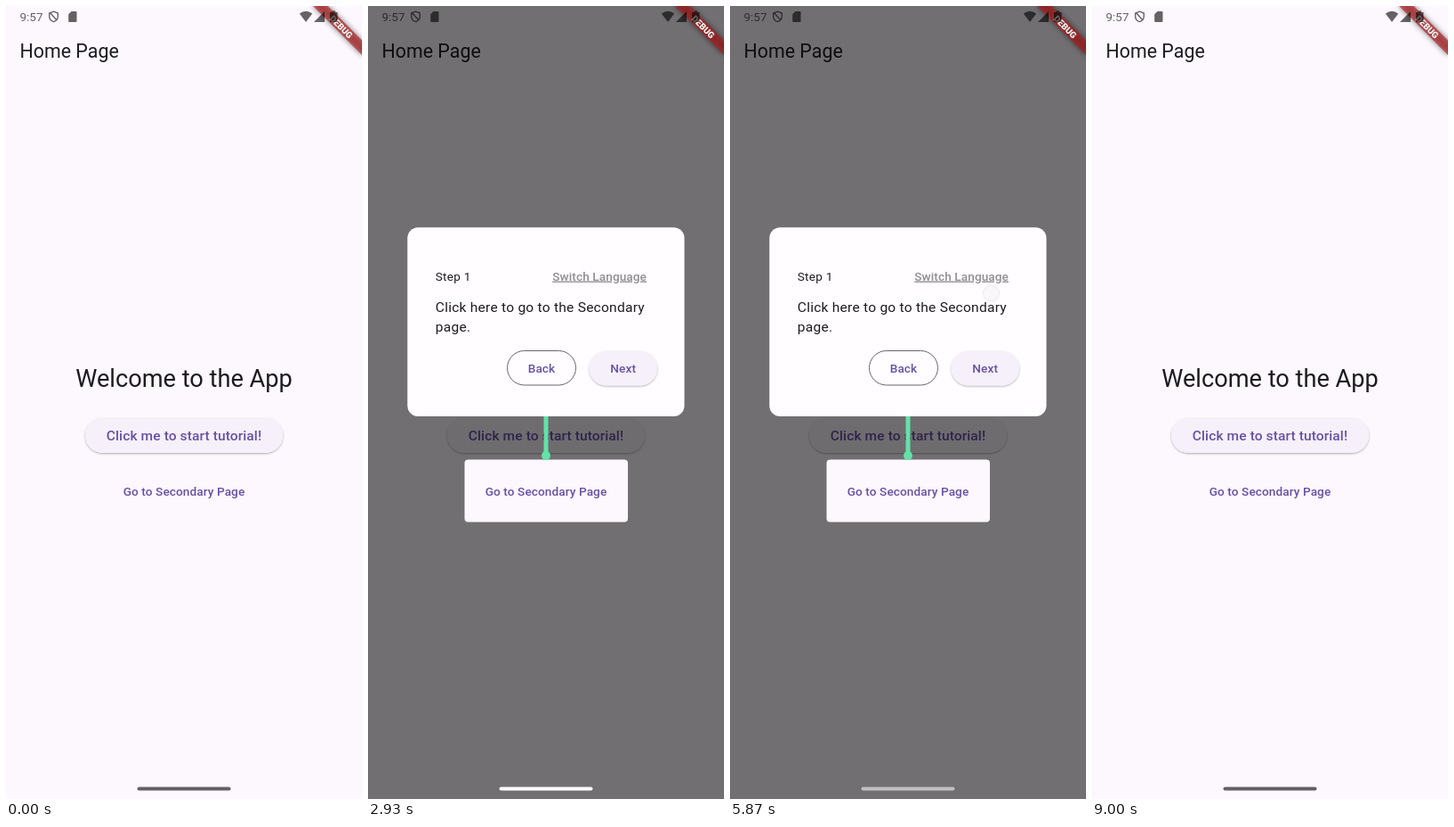
An HTML page that plays this animation: 400x889 px, repeating every 9070 ms.

```html
<!DOCTYPE html>
<html lang="en">
<head>
<meta charset="utf-8">
<title>App tutorial</title>
<style>
  html, body { margin: 0; width: 100%; height: 100%; overflow: hidden; background: #fdf7fe; }
  svg { display: block; width: 100%; height: 100%; }
  text { font-family: Roboto, 'Noto Sans CJK SC', 'Noto Sans CJK', sans-serif; fill: #1d1b20; white-space: pre; }
  .label { font-size: 13.6px; font-weight: 500; letter-spacing: .097px; fill: #6750a4; }
  .big { font-size: 15.55px; }
  .mid { text-anchor: middle; }
  .step { font-size: 13.6px; letter-spacing: .24px; }
  .body { font-size: 15.55px; letter-spacing: .24px; }
  .switch { fill: #918d93; text-anchor: end; text-decoration: underline; }
  .raised { fill: #f6f0fa; filter: url(#lift); }
  .outlined { fill: none; stroke: #6b666f; }
</style>
</head>
<body>
<svg viewBox="0 0 400 889" preserveAspectRatio="none">
  <defs>
    <filter id="lift" x="-10%" y="-20%" width="120%" height="150%">
      <feDropShadow dx="0" dy="1" stdDeviation=".9" flood-color="#000" flood-opacity=".32"/>
    </filter>
    <filter id="blur" x="-20%" y="-80%" width="140%" height="260%"><feGaussianBlur stdDeviation="3"/></filter>
    <radialGradient id="ink">
      <stop offset="0" stop-color="#6750a4" stop-opacity=".17"/>
      <stop offset=".45" stop-color="#6750a4" stop-opacity=".12"/>
      <stop offset="1" stop-color="#6750a4" stop-opacity="0"/>
    </radialGradient>
    <clipPath id="startClip"><rect x="89" y="462" width="222" height="39" rx="19.5"/></clipPath>
    <clipPath id="enClip"><rect x="196" y="284" width="129" height="38.5" rx="19.2"/></clipPath>
    <clipPath id="zhClip"><rect x="247" y="306" width="78" height="38.5" rx="19.2"/></clipPath>
  </defs>

  <rect width="400" height="889" fill="#fdf7fe"/>
  <text x="15.5" y="57.5" font-size="21.4">Home Page</text>
  <text class="mid" x="200" y="427" font-size="27.2">Welcome to the App</text>
  <rect class="raised" x="89" y="462" width="222" height="39" rx="19.5"/>
  <g id="startInk" clip-path="url(#startClip)"></g>
  <text class="label big mid" x="200" y="487">Click me to start tutorial!</text>
  <text class="label mid" x="200" y="549">Go to Secondary Page</text>

  <g id="tour">
    <path fill="#000" fill-opacity=".55" fill-rule="evenodd"
      d="M0 0H400V889H0ZM112.5 508.5H288a4 4 0 0 1 4 4V574.500a4 4 0 0 1-4 4H112.500a4 4 0 0 1-4-4V512.500a4 4 0 0 1 4-4Z"/>
    <rect id="card" x="44.300" width="311.200" rx="12" fill="#fffdff"/>
    <path d="M200 460V503" stroke="#63e2a8" stroke-width="5"/>
    <circle cx="200" cy="504" r="5" fill="#63e2a8"/>
    <g id="en">
      <text class="step" x="75.800" y="307.500">Step 1</text>
      <g id="enInk" clip-path="url(#enClip)"></g>
      <text class="label switch" x="313" y="307.500">Switch Language</text>
      <text class="body" x="75.800" y="342.500">Click here to go to the Secondary</text>
      <text class="body" x="75.800" y="365">page.</text>
      <rect class="outlined" x="156.500" y="386.500" width="77" height="38.500" rx="19.250"/>
      <text class="label mid" x="195" y="410.500">Back</text>
      <rect class="raised" x="248.500" y="387" width="76.500" height="38.500" rx="19.250"/>
      <text class="label mid" x="286.700" y="410.500">Next</text>
    </g>
    <g id="zh" lang="zh-CN">
      <text class="step" x="75.800" y="330.500">步骤 1</text>
      <g id="zhInk" clip-path="url(#zhClip)"></g>
      <text class="label switch" x="313" y="330.500">切换语言</text>
      <text class="body" x="75.800" y="365">点击这里访问次要页面。</text>
      <rect class="outlined" x="147.500" y="386.500" width="73.500" height="38.500" rx="19.250"/>
      <text class="label mid" x="184.200" y="411">返回</text>
      <rect class="raised" x="236" y="387" width="89" height="38.500" rx="19.250"/>
      <text class="label mid" x="280.500" y="411">下一步</text>
    </g>
  </g>

  <g transform="translate(400 0) rotate(45)">
    <rect x="-39" y="27.200" width="78" height="11.700" opacity=".5" filter="url(#blur)"/>
    <rect x="-39" y="27.200" width="78" height="11.700" fill="#b71c1c" fill-opacity=".63"/>
    <text class="mid" x="0" y="36.600" font-size="9.900" font-weight="900" style="fill:#fff">DEBUG</text>
  </g>

  <g opacity=".6">
    <text x="15.500" y="16.500" font-size="13.500" style="fill:#000">9:57</text>
    <path d="M53.500 6.200L58.300 8V11.500C58.300 14.500 56.200 16.800 53.500 17.700C50.800 16.800 48.700 14.500 48.700 11.500V8ZM49.500 7.500L57 16" fill="none" stroke="#000" stroke-width="1.400"/>
    <path d="M73.500 6H78.500a1 1 0 0 1 1 1V17a1 1 0 0 1-1 1H71.200a1 1 0 0 1-1-1V9.300Z"/>
    <path d="M329.800 8.600Q337 3 344.200 8.600L337 18Z"/>
    <path d="M358 6V18H346Z"/>
    <path d="M366.500 5.500H370V7H372.500V18H364V7H366.500Z"/>
  </g>

  <rect id="nav" x="147.500" y="875.500" width="105" height="4" rx="2"/>
  <circle id="touch" r="9" fill="#d2d0d8" fill-opacity=".5" stroke="#a9a4bd" stroke-opacity=".55" stroke-width="1.500"/>
</svg>
<script>
const LOOP = 9070;
const $ = id => document.getElementById(id);
const clamp = v => Math.max(0, Math.min(1, v));
const show = (id, on) => $(id).setAttribute('display', on ? 'inline' : 'none');
const within = (t, a, b) => t >= a && t < b;

const taps = [
  { x: 214, y: 485, down: 1560, up: 1850, ink: 'startInk', reach: 92 },
  { x: 272, y: 307, down: 3380, up: 3600, ink: 'enInk', reach: 45 },
  { x: 293.5, y: 322, down: 5450, up: 5790, ink: 'zhInk', reach: 34 },
  { x: 326.500, y: 520, down: 7590, up: 7745 }
];
const navKeys = [[0, 0], [1940, 0], [2200, 1], [5790, 1], [5870, .6], [6100, 1], [7750, 1], [8050, 0], [LOOP, 0]];

for (const { ink, x, y } of taps) {
  if (ink) $(ink).innerHTML =
    `<rect width="400" height="889" fill="#4a4458" fill-opacity=".05"/><circle cx="${x}" cy="${y}" fill="url(#ink)"/>`;
}

function track(keys, t) {
  const i = keys.findIndex(k => k[0] > t);
  const [t0, v0] = keys[i - 1], [t1, v1] = keys[i];
  return v0 + (v1 - v0) * (t - t0) / (t1 - t0);
}

function drawTap(tap, t) {
  if (!tap.ink) return;
  const grow = clamp((t - tap.down) / 240);
  const fade = clamp((t - tap.down) / 100) * (1 - clamp((t - tap.up) / 250));
  $(tap.ink).setAttribute('opacity', fade);
  $(tap.ink).lastChild.setAttribute('r', tap.reach * (.2 + .8 * (1 - (1 - grow) ** 2)));
}

function draw(t) {
  const tour = within(t, 1865, 5798) || within(t, 5866, 7665);
  const zh = within(t, 3600, 5798);
  show('tour', tour);
  show('en', !zh);
  show('zh', zh);
  const top = zh ? 270.300 : 248.200;
  $('card').setAttribute('y', top);
  $('card').setAttribute('height', 460 - top);

  taps.forEach(tap => drawTap(tap, t));
  const tap = taps.find(p => within(t, p.down, p.up + 110));
  show('touch', tap);
  if (tap) {
    $('touch').setAttribute('cx', tap.x);
    $('touch').setAttribute('cy', tap.y);
    $('touch').setAttribute('opacity', 1 - clamp((t - tap.up) / 110));
  }

  const n = track(navKeys, t);
  const mix = (a, b) => Math.round(a + (b - a) * n);
  $('nav').setAttribute('fill', `rgb(${mix(98, 255)},${mix(95, 255)},${mix(102, 255)})`);
}

const start = performance.now();
function tick() {
  draw((performance.now() - start) % LOOP);
  requestAnimationFrame(tick);
}
tick();
</script>
</body>
</html>
```
